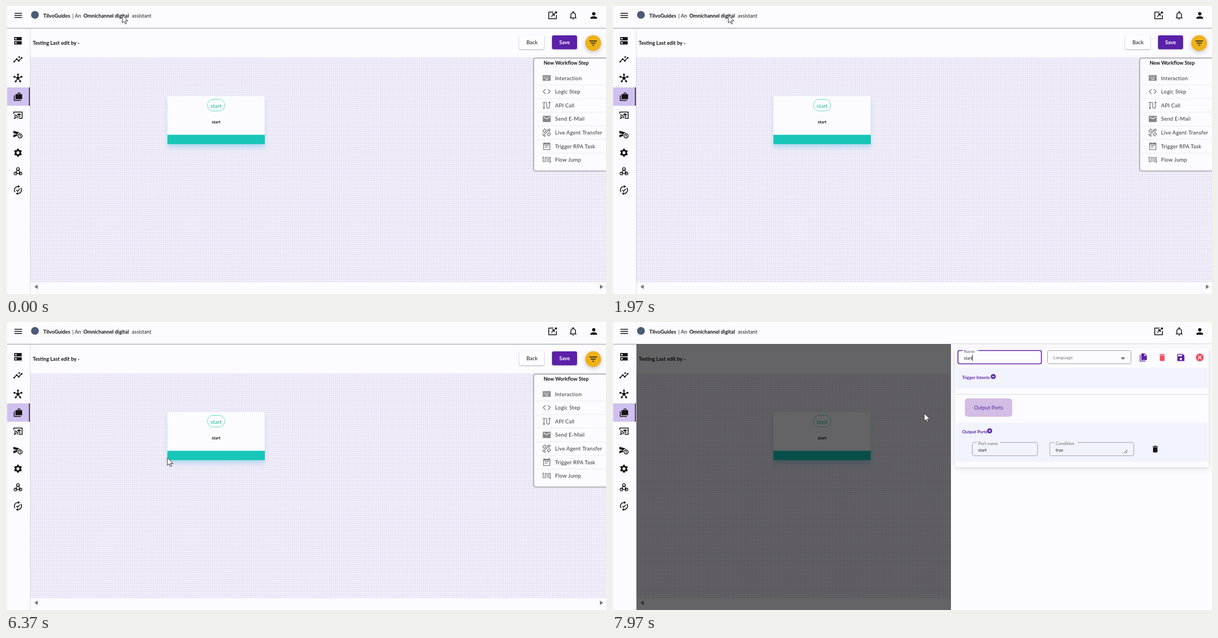
Animation of 1078x520 px, one loop 8 s. Source, as an HTML page:

```html
<!DOCTYPE html>
<html lang="en">
<head>
<meta charset="utf-8">
<title>Workflow editor</title>
<style>
html, body { margin: 0; width: 100%; height: 100%; overflow: hidden; background: #fbfaff; }
svg { display: block; width: 1078px; height: 520px; }
text { font-family: Lato, "Open Sans", sans-serif; fill: #1c1c1c; }
.b { font-weight: 700; fill: #111; }
</style>
</head>
<body>
<svg id="stage" viewBox="0 0 1078 520"></svg>
<script>
const dot = (x, y, r) => `M${x - r} ${y}a${r} ${r} 0 1 0 ${2 * r} 0a${r} ${r} 0 1 0 ${-2 * r} 0z`;

// name: [filled path, stroked path, stroke width] on a 24 unit square
const ICONS = {
  menu: ['M3 18h18v-2H3zm0-5h18v-2H3zm0-7v2h18V6z'],
  dns: ['M3 3h18v8H3zM3 13h18v8H3z' + dot(7, 7, 2) + dot(7, 17, 2)],
  insights: [dot(3, 17.5, 2) + dot(9, 11, 2) + dot(14, 15.5, 2) + dot(21, 8, 2) +
    'M15 3l1 2.5 2.5 1-2.5 1-1 2.5-1-2.5-2.5-1 2.5-1z', 'M3 17.5L9 11l5 4.5L21 8'],
  hub: [[[12, 12, 3.6], [12, 3.5, 2.4], [3.5, 9, 2.4], [20.5, 9, 2.4], [6.5, 20, 2.4], [17.5, 20, 2.4]]
    .map(c => dot(...c)).join(''), 'M12 12V4M12 12L4 9M12 12l8-3M12 12l-5 8M12 12l5 8'],
  bag: ['M6 6h5V4a2 2 0 012-2h3a2 2 0 012 2v2h4v12H6zM12.7 4v2h3.6V4z', 'M3 9v12h16'],
  cast: [dot(4, 19, 1.8) + 'M9 10l5.5-3 5.5 3-5.5 3zM11 13l3.5 2 3.5-2v2l-3.5 2z',
    'M2 8V4h20v15h-8M3 10.5a8.5 8.5 0 018.5 8.5M3 14.5a4.5 4.5 0 014.5 4.5'],
  send: ['M1 4v6l9 2-9 2v6l9-3.5a7 7 0 017-8z', 'M17 11.5a5 5 0 100 10 5 5 0 000-10M17 13.5v3l2 1.5'],
  gear: [dot(12, 12, 7.5) + dot(12, 12, 3.4),
    'M12 2.5v4M12 17.5v4M3.8 7.2l3.4 2M16.8 14.8l3.4 2M20.2 7.2l-3.4 2M7.2 14.8l-3.4 2', 4.5],
  hook: ['', dot(12, 6.5, 3.4) + dot(6, 17, 3.4) + dot(18, 17, 3.4) + 'M11 8l-5 9M13 8l5 9M8 17h10', 1.8],
  changes: ['M12 0l5 3.5-5 3.5zM12 24l-5-3.5 5-3.5z',
    'M5 17A8.6 8.6 0 0112 3.5M19 7A8.6 8.6 0 0112 20.5M8 12l3 3 5.5-6'],
  open: [dot(20, 5, 2.8), 'M14 4H3v16h18v-9M9 15l7-7M10.5 8H16v5.5'],
  bell: ['M10 20h4a2 2 0 01-4 0zM10.5 2h3v3h-3z', 'M6.5 17v-6a5.5 5.5 0 0111 0v6l1 1h-13z'],
  person: [dot(12, 8, 4) + 'M12 14c-2.7 0-8 1.3-8 4v2h16v-2c0-2.7-5.3-4-8-4z'],
  filter: ['M10 18h4v-2h-4zM3 6v2h18V6zM6 13h12v-2H6z'],
  keyboard: ['M2 5h20v14H2zM5 8v2h2V8zM8.5 8v2h2V8zM12 8v2h2V8zM16 8v2h2V8zM5 11.5v2h2v-2zM8.5 11.5v2h2v-2zM12 11.5v2h2v-2zM16 11.5v2h2v-2zM8 15v2h8v-2z'],
  code: ['', 'M9 6l-6 6 6 6M15 6l6 6-6 6'],
  api: [dot(5, 19, 2.5) + dot(19, 5, 2.5), 'M5 18V8a3.5 3.5 0 017 0v8a3.5 3.5 0 007 0V5M2 5h5'],
  mail: ['M2 4h20v16H2zM4 6v2l8 5 8-5V6l-8 5z'],
  agent: ['', 'M2 8l5-5 4 4-5 5zM13 17l5-5 4 4-5 5zM7.5 15.500l9-9M5 15a4 4 0 004 4M2 15a7 7 0 007 7M14 5l4 4 3-4-2-2z'],
  note: ['M7 10h10v2H7zM7 14h7v2H7zM3 4h18v4H3z', 'M4 5h16v16H4zM7 2v3M17 2v3'],
  jump: [dot(3, 6, 2) + dot(21, 18, 2), 'M3 6v11h5V6h5v12M17 18V6h4v12'],
  copy: ['M4 5H2v18h15v-2H4zM6 1h9l6 6v12H6zM14 2.5V8h5.5z'],
  trash: ['M6 19a2 2 0 002 2h8a2 2 0 002-2V7H6zM19 4h-3.5l-1-1h-5l-1 1H5v2h14z'],
  save: ['M3 3h14l4 4v14H3zM5 5v4h10V5z' + dot(12, 16, 3)],
  cancel: [dot(12, 12, 10) + 'M17 8.4L15.6 7 12 10.6 8.4 7 7 8.4l3.6 3.6L7 15.6 8.4 17l3.6-3.6 3.6 3.6 1.4-1.4-3.6-3.6z'],
  plus: [dot(12, 12, 10) + 'M11 7h2v4h4v2h-4v4h-2v-4H7v-2h4z']
};

const icon = (name, x, y, size = 18, color = '#151515') => {
  const [fill, line = '', w = 2] = ICONS[name], k = size / 24;
  return `<g transform="translate(${x - size / 2} ${y - size / 2}) scale(${k})">` +
    `<path d="${fill}" fill="${color}" fill-rule="evenodd"/>` +
    `<path d="${line}" fill="none" stroke="${color}" stroke-width="${w}"/></g>`;
};
const text = (s, x, y, size, attrs = '') => `<text x="${x}" y="${y}" font-size="${size}" ${attrs}>${s}</text>`;
const rect = (x, y, w, h, fill, attrs = '') =>
  `<rect x="${x}" y="${y}" width="${w}" height="${h}" fill="${fill}" ${attrs}/>`;
const field = (x, y, w, h, label, value, id = '') =>
  rect(x + .5, y + .5, w, h, 'none', `rx="3" stroke="#a3a3a8" ${id && `id="${id}"`}`) +
  (value ? rect(x + 9, y - 1, label.length * 4.2 + 3, 4, '#fbfbff') +
    text(label, x + 11, y + 4.5, 7.8, 'style="fill:#666"') + text(value, x + 11, y + 16.5, 7.6)
    : text(label, x + 11, y + 15.5, 8.4, 'style="fill:#777"'));

const PURPLE = '#5b21a8', TEAL = '#17c6b7';
const side = ['dns', 'insights', 'hub', 'bag', 'cast', 'send', 'gear', 'hook', 'changes'];
const steps = [['keyboard', 'Interaction'], ['code', 'Logic Step'], ['api', 'API Call'], ['mail', 'Send E-Mail'],
  ['agent', 'Live Agent Transfer'], ['note', 'Trigger RPA Task'], ['jump', 'Flow Jump']];

const defs = `<defs>
  <pattern id="grid" x="44" y="93" width="3.51" height="3.51" patternUnits="userSpaceOnUse">
    <path d="M0 .5H3.51M.5 0V3.51" stroke="#e0d9f0"/></pattern>
  <filter id="soft" x="-20%" y="-30%" width="140%" height="160%"><feGaussianBlur stdDeviation="4"/></filter>
  <filter id="tight" x="-20%" y="-30%" width="140%" height="160%"><feGaussianBlur stdDeviation="1.2"/></filter>
</defs>`;

const canvas = rect(44, 40, 1034, 480, '#fcfbff') + rect(44, 40, 1034, 1, '#bbb9c2') +
  rect(44, 93, 1034, 406, 'url(#grid)') + rect(44, 93, 1034, 1, '#e2dff0') +
  `<path d="M57 503v8l-6-4zM1067 503v8l6-4z" fill="#777"/>` +
  text('Testing Last edit by -', 48, 70, 9.2, 'class="b"') +
  rect(922, 54, 45, 25, '#aaa7b4', 'rx="3" filter="url(#tight)"') + rect(922, 53, 45, 25, '#fdfcff', 'rx="3"') +
  text('Back', 945, 69, 9.5, 'text-anchor="middle"') +
  rect(981, 54, 45, 25, '#aaa7b4', 'rx="3" filter="url(#tight)"') + rect(981, 53, 45, 25, PURPLE, 'rx="3"') +
  text('Save', 1003.5, 69, 9.2, 'text-anchor="middle" class="b" style="fill:#fff"') +
  `<circle cx="1055" cy="69.5" r="14" fill="#999" opacity=".6" filter="url(#soft)"/>
   <circle cx="1055" cy="67" r="14.2" fill="#eeb219"/>` + icon('filter', 1055, 67) +
  rect(290, 168, 175, 88, '#a9d4ef', 'opacity=".75" filter="url(#soft)"') +
  rect(290, 163, 175, 86, '#fcfcff', 'rx="2"') + rect(290, 232.5, 175, 17, TEAL) +
  rect(362, 168.5, 31, 21, 'none', `rx="10.5" stroke="${TEAL}" stroke-dasharray="2 1"`) +
  text('start', 377.5, 183.5, 10, 'text-anchor="middle" style="fill:#19b99f"') +
  text('start', 377.5, 211.5, 7.5, 'text-anchor="middle" class="b"') +
  `<g id="ports" fill="#ddd" stroke="#665c78" stroke-width="1.5">
    <circle cx="290" cy="241" r="4.5"/><circle cx="465" cy="241" r="4.5"/></g>` +
  rect(948, 94, 140, 204, '#fcfbff', 'rx="3" stroke="#77747d"') +
  text('New Workflow Step', 966, 106, 9, 'class="b"') +
  steps.map(([name, label], i) => {
    const y = 130 + i * 24.6;
    return icon(name, 971.5, y, 17, '#858585') +
      text(label, 986.5, y + 3.5, 9.5, 'letter-spacing=".25" style="fill:#333"') +
      (i < 6 ? rect(953, y + 12, 125, 1, '#ecebf2') : '');
  }).join('');

const panel = rect(609, 40, 480, 480, '#fcfbff') +
  rect(616, 50, 456, 214, '#bbb', 'opacity=".6" filter="url(#soft)"') + rect(616, 47, 456, 215, '#fcfbff') +
  rect(618, 83, 452, 37, '#f1f3fd') + rect(617, 130, 455, 1, '#dcdae2') + rect(618, 182, 452, 70, '#f1f3fd') +
  field(621, 51, 150, 24, 'Name *', 'start', 'name') +
  `<path id="caret" d="M647.5 59v11" stroke="#222"/>` +
  field(782, 51, 150, 24, 'Language', '') + `<path d="M914 64h8l-4 4z" fill="#666"/>` +
  icon('copy', 955, 64, 16, PURPLE) + icon('trash', 988.5, 64, 17, '#f34d60') +
  icon('save', 1022, 64, 17, PURPLE) + icon('cancel', 1056, 64, 17, '#f34d60') +
  text('Trigger Intents', 629, 102.5, 7.8, `class="b" style="fill:${PURPLE}"`) + icon('plus', 685, 98.5, 11, PURPLE) +
  rect(634, 138, 85, 33, '#d3bde4', 'rx="5"') +
  text('Output Ports', 676.5, 157.5, 9.2, `text-anchor="middle" style="fill:${PURPLE}"`) +
  text('Output Ports', 629, 200.5, 7.8, `class="b" style="fill:${PURPLE}"`) + icon('plus', 678.5, 196.5, 11, PURPLE) +
  field(647, 217, 117, 24, 'Port name', 'start') + field(786, 217, 151, 24, 'Condition', 'true') +
  `<path d="M919 237l7-6M923 237l3-3" stroke="#555"/>` + icon('trash', 976, 229.5, 16);

const chrome = rect(0, 0, 1078, 40, '#fcfbfe') + rect(0, 39, 1078, 1, '#d5d3da') +
  rect(0, 40, 44, 480, '#fcfbff') + rect(0, 40, 44, 1, '#bbb9c2') +
  rect(0, 0, 2, 520, '#f0eff3') + rect(43, 41, 1, 479, '#dddbe4') +
  rect(2, 147, 40, 33, '#d0c0ef') + rect(41, 147, 2, 33, '#4c405f') +
  icon('menu', 22, 17) + `<circle cx="52" cy="16" r="7" fill="#4b5b78"/>` +
  text('TilvoGuides', 67, 20.5, 9.2, 'class="b"') + text('| An', 119, 20.5, 9.4) +
  text('Omnichannel digital', 139, 20.5, 9.2, 'class="b"') + text('assistant', 226, 20.5, 9.2) +
  icon('open', 982, 17) + icon('bell', 1019, 17) + icon('person', 1056, 17) +
  side.map((name, i) => icon(name, 21.5, 62.7 + i * 33.7)).join('');

const pointers = `<g id="arrow"><path d="M0 0V14L3.3 11 5.5 16 7.6 15 5.4 10.3H10Z" fill="#fff" stroke="#333"/></g>
  <g id="hand"><path d="M-1.3 9V1.2a1.3 1.3 0 012.6 0V6l6 1.3q1.3.4 1 2L7 14v2H0L-4.5 9.5q0-2 1.8-1.3z" fill="#fff" stroke="#222"/></g>`;

const $ = id => document.getElementById(id);
$('stage').innerHTML = defs + canvas + `<rect id="shade" x="44" y="40" width="1034" height="480"/>` +
  `<g id="panel">${panel}</g>` + chrome + pointers;

const clamp = v => Math.max(0, Math.min(1, v));
const smooth = v => v * v * (3 - 2 * v);

// cubic-bezier(.25, .8, .25, 1)
function slide(x) {
  let lo = 0, hi = 1, u = .5;
  for (let i = 0; i < 20; i++) {
    u = (lo + hi) / 2;
    if (.75 * u * (1 - u) + u ** 3 < x) lo = u; else hi = u;
  }
  return 2.4 * (1 - u) ** 2 * u + 3 * (1 - u) * u * u + u ** 3;
}

// pointer moves: start, end, x, y
const moves = [[3480, 4080, 290, 245], [6400, 6680, 376.5, 238.5], [7540, 7840, 561, 165]];
const OPEN = 7202, SLIDE = 400;
const show = (id, on) => $(id).setAttribute('visibility', on ? 'visible' : 'hidden');

function draw(t) {
  let x = 209, y = 16.5;
  for (const [from, to, tx, ty] of moves) {
    const k = smooth(clamp((t - from) / (to - from)));
    x += (tx - x) * k;
    y += (ty - y) * k;
  }
  const over = t >= 6480 && t < 7560;
  for (const id of ['arrow', 'hand']) $(id).setAttribute('transform', `translate(${x} ${y})`);
  show('hand', over);
  show('arrow', !over);
  show('ports', over);

  const p = t <= OPEN ? 0 : t >= OPEN + SLIDE ? 1 : slide((t - OPEN) / SLIDE);
  $('panel').setAttribute('transform', `translate(${(1 - p) * 469} 0)`);
  show('panel', p > 0);
  $('shade').setAttribute('opacity', .6 * p);
  const focus = p === 1;
  $('name').setAttribute('stroke', focus ? PURPLE : '#a3a3a8');
  $('name').setAttribute('stroke-width', focus ? 1.6 : 1);
  $('caret').setAttribute('opacity', focus ? 1 : 0);
}

const start = performance.now();
function tick() {
  draw((performance.now() - start) % 8000);
  requestAnimationFrame(tick);
}
tick();
</script>
</body>
</html>
```
